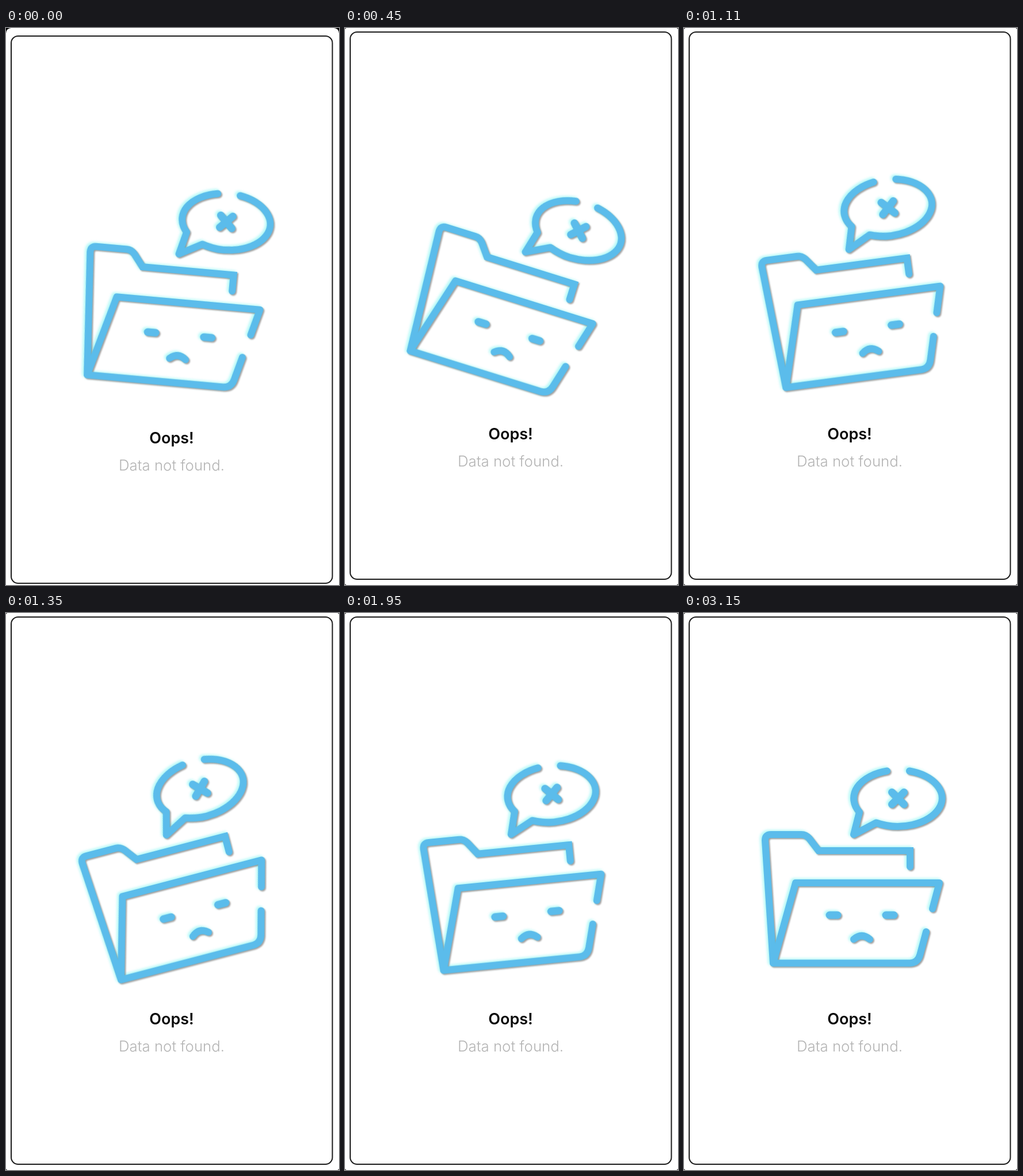
An HTML page that plays this animation: 579 px wide and 968 px high, repeating every 3.21 s.

```html
<!DOCTYPE html>
<html lang="en">
<head>
<meta charset="utf-8">
<title>Data not found</title>
<style>
  html, body {
    margin: 0;
    width: 100%;
    height: 100%;
    overflow: hidden;
    background: #000;
  }
  .card {
    position: absolute;
    inset: 0;
    overflow: hidden;
    background: #fff;
    border-radius: 3px;
    animation: corners 3210ms infinite;
  }
  svg {
    display: block;
    width: 579px;
    height: 968px;
    animation: settle 3210ms infinite;
  }
  .frame {
    fill: none;
    stroke: #1c1c1c;
    stroke-width: 2;
  }
  /* light stays put while the drawing turns inside it */
  .relief {
    filter: drop-shadow(2px 2px 1px rgba(70, 60, 60, .48))
            drop-shadow(-3px -2px 2px rgba(165, 248, 246, .85));
  }
  .art {
    fill: none;
    stroke: #5bbceb;
    stroke-width: 12;
    stroke-linecap: round;
    stroke-linejoin: round;
    transform-origin: 290px 448px;
    animation: sway 3210ms infinite;
  }
  .bold { stroke-width: 13; }
  text {
    font-family: Inter, "Liberation Sans", sans-serif;
    text-anchor: middle;
  }
  .title { font-size: 27px; font-weight: 600; fill: #0a0a0a; }
  .note { font-size: 25.8px; font-weight: 300; fill: #b4b4b4; }

  @keyframes sway {
    0% { transform: rotate(5.1deg); animation-timing-function: cubic-bezier(.1625, .416, .365, 1); }
    20.16% { transform: rotate(18deg); animation-timing-function: linear; }
    21.12% { transform: rotate(18deg); animation-timing-function: cubic-bezier(.25, .1, .28, 1); }
    51.09% { transform: rotate(-16.9deg); animation-timing-function: ease; }
    76.01%, 100% { transform: rotate(0deg); }
  }
  @keyframes settle {
    0% { transform: translateY(7px); animation-timing-function: ease-out; }
    6.5%, 100% { transform: none; }
  }
  @keyframes corners {
    0% { border-radius: 9px 9px 0 0; animation-timing-function: ease-out; }
    6.5%, 100% { border-radius: 3px; }
  }
</style>
</head>
<body>
<div class="card">
  <svg viewBox="0 0 579 968">
    <rect class="frame" x="9" y="7" width="558.5" height="951" rx="12"/>
    <g class="relief">
      <g class="art">
        <!-- folder back and front -->
        <path stroke-linejoin="miter" d="M393 441V413H234L218 392Q212 385 204 385H151Q141 385 141 395L155 608"/>
        <path d="M432 514L444 469H194L155 608.5H393Q406 608 410 595L421 554"/>
        <!-- face -->
        <path class="bold" d="M253 525h14M351 525h14"/>
        <path d="M295 567Q309 555 323 567"/>
        <!-- speech bubble -->
        <path d="M353 274.5A77 49 0 0 0 305 346L295 385L334 364.5A77 49 0 1 0 392 274.5"/>
        <path class="bold" d="M361.5 311.5l21 21m0 -21l-21 21"/>
      </g>
    </g>
    <text class="title" x="288" y="715">Oops!</text>
    <text class="note" x="288" y="762">Data not found.</text>
  </svg>
</div>
</body>
</html>
```
